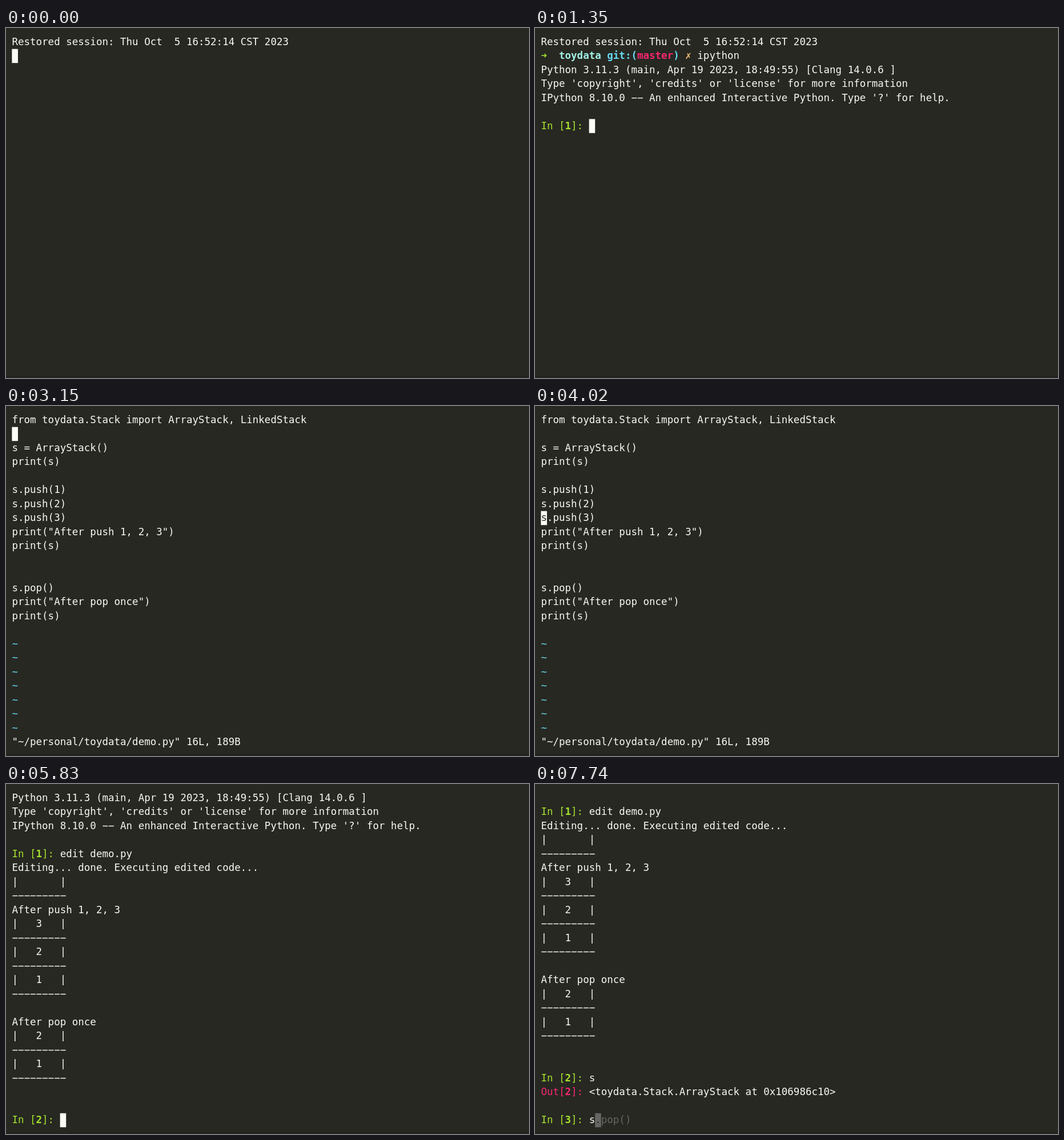
An HTML page with a canvas that plays this animation: 916 px wide and 612 px high, repeating every 8000 ms.

```html
<!DOCTYPE html>
<html lang="en">
<head>
<meta charset="utf-8">
<title>Terminal session</title>
<style>
  html, body { margin: 0; width: 100%; height: 100%; overflow: hidden; background: #272822; }
  canvas { display: block; width: 916px; height: 612px; }
</style>
</head>
<body>
<canvas id="screen" width="916" height="612"></canvas>
<script>
const LOOP = 8000;
const LEFT = 10.4, TOP = 12.2, CELL = 10.535, LINE = 24.5, BASELINE = 17.6;
const FONT = '17.5px "DejaVu Sans Mono", monospace';
const BACKGROUND = '#272822', CURSOR = '#fdfdf6';

// Inline style tags: {g} green, {G} bold green, and so on; each line starts as {w}.
const COLORS = {
  w: '#f8f8f2', g: '#a6e22e', c: '#66d9ef', a: '#a1efe4',
  m: '#f92672', y: '#f4bf75', s: '#666664'
};

const ctx = document.getElementById('screen').getContext('2d');

const prompt = n => `{g}In [{G}${n}{g}]: {w}`;
const shellPrompt = '{G}➜  {A}toydata {C}git:({M}master{C}){w} {y}✗{w} ';
const session = 'Restored session: Thu Oct  5 16:52:14 CST 2023';
const banner = [
  'Python 3.11.3 (main, Apr 19 2023, 18:49:55) [Clang 14.0.6 ]',
  "Type 'copyright', 'credits' or 'license' for more information",
  "IPython 8.10.0 -- An enhanced Interactive Python. Type '?' for help.",
  ''
];
const rule = '-'.repeat(9);
const stack = (...items) => items.flatMap(item => [`|   ${item}   |`, rule]);

const shell = [session, shellPrompt + 'ipython'];
const ipython = [...shell, ...banner];
const source = [
  'from toydata.Stack import ArrayStack, LinkedStack', '',
  's = ArrayStack()', 'print(s)', '',
  's.push(1)', 's.push(2)', 's.push(3)',
  'print("After push 1, 2, 3")', 'print(s)', '', '',
  's.pop()', 'print("After pop once")', 'print(s)', '',
  ...Array(7).fill('{c}~')
];
const editor = [...source, '"~/personal/toydata/demo.py" 16L, 189B'];
const result = [
  prompt(1) + 'edit demo.py',
  'Editing... done. Executing edited code...',
  ...stack(' '), 'After push 1, 2, 3',
  ...stack(3, 2, 1), '', 'After pop once',
  ...stack(2, 1), '', ''
];
const executed = [...banner, ...result];
const evaluated = [
  '', ...result, prompt(2) + 's',
  '{m}Out[{M}2{m}]: {w}<toydata.Stack.ArrayStack at 0x106986c10>', ''
];

const states = [];
const show = (time, lines, col, row, cursor = CURSOR) =>
  states.push({ time, lines, col, row, cursor });

// Spreads count steps evenly from start to end, both included.
function steps(start, end, count, action) {
  for (let i = 0; i < count; i++) action(start + (end - start) * i / (count - 1), i);
}

// Shows the first n characters of a command with the rest as a grey suggestion.
function suggest(time, lines, label, command, n) {
  const line = label + command.slice(0, n) + '{s}' + command.slice(n);
  show(time, [...lines, line], 8 + n, lines.length, n < command.length ? COLORS.s : CURSOR);
}

const edit = (time, n) => suggest(time, ipython, prompt(1), 'edit demo.py', n);
const moveTo = (time, row) => show(time, editor, 0, row);
const command = (time, text) => show(time, [...source, text], text.length, 23);

show(0, [session], 0, 1);
show(180, [session, shellPrompt], 26, 1);
steps(590, 1170, 8, (time, i) => i < 7
  ? show(time, [session, shellPrompt + 'ipython'.slice(0, i + 1)], 27 + i, 1)
  : show(time, shell, 0, 2));
show(1350, [...ipython, prompt(1)], 8, 6);
steps(1490, 1730, 4, (time, i) => edit(time, i + 1));
steps(1930, 2240, 5, (time, i) => edit(time, i + 5));
edit(2310, 12);
show(2395, [...ipython, result[0]], 0, 7);
show(2480, [...ipython, result[0], 'Editing...'], 11, 7);
moveTo(2560, 0);
steps(3150, 3250, 2, (time, i) => moveTo(time, i + 1));
steps(3390, 3590, 3, (time, i) => moveTo(time, i + 3));
moveTo(3770, 6);
steps(4020, 4360, 9, (time, i) => moveTo(time, i + 7));
command(5300, ':');
command(5630, ':w');
command(5680, ':wq');
show(5830, [...executed, prompt(2)], 8, 23);
suggest(7380, executed, prompt(2), 's.pop()', 1);
show(7450, [...evaluated, prompt(3)], 8, 23);
suggest(7740, evaluated, prompt(3), 's.pop()', 1);

function drawChar(char, col, row, color, bold) {
  if (char === ' ') return;
  ctx.font = (bold ? 'bold ' : '') + FONT;
  ctx.fillStyle = color;
  // The minus glyph gives the wide terminal dash.
  ctx.fillText(char === '-' ? '−' : char, LEFT + col * CELL, TOP + row * LINE + BASELINE);
}

function drawLine(line, row, cursorCol) {
  let style = 'w', col = 0;
  line.split(/\{(\w)\}/).forEach((part, i) => {
    if (i % 2) { style = part; return; }
    const key = style.toLowerCase();
    for (const char of part) {
      drawChar(char, col, row, col === cursorCol ? BACKGROUND : COLORS[key], style !== key);
      col++;
    }
  });
}

function draw({ lines, col, row, cursor }) {
  ctx.fillStyle = BACKGROUND;
  ctx.fillRect(0, 0, 916, 612);
  ctx.fillStyle = '#232420';
  ctx.fillRect(0, 608, 916, 4);
  ctx.fillStyle = cursor;
  ctx.fillRect(LEFT, TOP + row * LINE, 0, 0);
  ctx.fillRect(LEFT + col * CELL, TOP + row * LINE, CELL, LINE);
  lines.forEach((line, i) => drawLine(line, i, i === row ? col : -1));
}

const start = performance.now();
let current;
function frame() {
  const time = (performance.now() - start) % LOOP;
  const state = states.findLast(s => s.time <= time) || states[0];
  if (state !== current) draw(current = state);
  requestAnimationFrame(frame);
}
frame();
</script>
</body>
</html>
```
